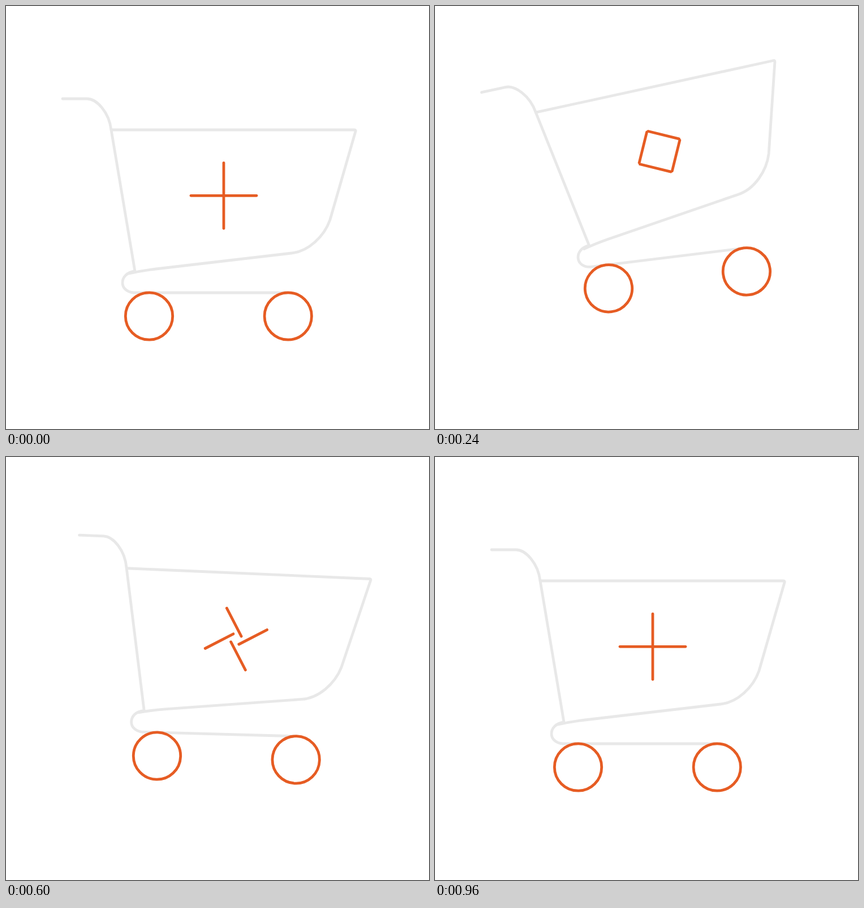
An HTML page that plays this animation: 748x748 px, repeating every 3330 ms.

```html
<!DOCTYPE html>
<html lang="en">
<head>
<meta charset="utf-8">
<title>Add to cart</title>
<style>
  html, body { margin: 0; width: 100%; height: 100%; overflow: hidden; background: #fff; }
  svg { display: block; width: 100vw; height: 100vh; fill: none; stroke-linecap: round; stroke-linejoin: round; }
  .frame { stroke: #e8e8e8; stroke-width: 4.8; }
  .accent { stroke: #e65c23; stroke-width: 4.8; }
</style>
</head>
<body>
<svg viewBox="0 0 748 748">
  <g id="chassis">
    <path class="frame" d="M499 507H226C213 506 206 498 206 489.5C206 480 213 471 228 469"/>
    <g id="basket">
      <path class="frame" d="M100 164H143C160 164 182 187 186 219L228 469"/>
      <path class="frame" d="M186 219H616Q619 219 618 222L573 378C563 407 535 434 505 437L265 465Q240 468 218 473"/>
      <g id="plus" class="accent">
        <path d="M-28 0H28"/><path d="M-28 0H28"/><path d="M-28 0H28"/><path d="M-28 0H28"/>
      </g>
    </g>
    <g class="accent">
      <circle cx="253" cy="548.5" r="41.7"/>
      <circle cx="498.8" cy="548.5" r="41.7"/>
    </g>
  </g>
</svg>
<script>
  const LOOP = 3330, STEP = 30;

  // Key poses of the hop: shift from rest, chassis angle, basket angle
  const poses = [
    { t: 0, x: 0, y: 0, tilt: 0, lean: 0 },
    { t: 90, x: 0, y: 0, tilt: 0, lean: 6.2 },
    { t: 240, x: 54, y: -49.2, tilt: -7, lean: -12.3 },
    { t: 370, x: 48, y: -25, tilt: -1, lean: 1 },
    { t: 480, x: 21, y: -16, tilt: 1.4, lean: 2.8 },
    { t: 600, x: 14, y: -20, tilt: 1.6, lean: 2.5 },
    { t: 720, x: 5, y: -9, tilt: 0.3, lean: -2.2 },
    { t: 780, x: 2.5, y: -5, tilt: 0, lean: -1.3 },
    { t: 960, x: 0, y: 0, tilt: 0, lean: 0 }
  ];

  // Smooth curve through the poses that never overshoots them
  function pose(t, key) {
    const last = poses.length - 1;
    if (t >= poses[last].t) return poses[last][key];
    const i = poses.findIndex(p => p.t > t) - 1;
    const slope = j => (poses[j + 1][key] - poses[j][key]) / (poses[j + 1].t - poses[j].t);
    const tangent = j => {
      if (j === 0 || j === last) return 0;
      const a = slope(j - 1), b = slope(j);
      return a * b <= 0 ? 0 : 2 * a * b / (a + b);
    };
    const span = poses[i + 1].t - poses[i].t;
    const u = (t - poses[i].t) / span, v = 1 - u;
    return poses[i][key] * v * v * (1 + 2 * u) + poses[i + 1][key] * u * u * (3 - 2 * u)
      + span * u * v * (tangent(i) * v - tangent(i + 1) * u);
  }

  // cubic-bezier(.34, 0, .23, 1) from 0 to 1 between two times
  function ease(t, from, to) {
    const x = Math.min(1, Math.max(0, (t - from) / (to - from)));
    let lo = 0, hi = 1;
    for (let n = 0; n < 24; n++) {
      const s = (lo + hi) / 2;
      const at = 1.02 * s * (1 - s) ** 2 + 0.69 * s * s * (1 - s) + s ** 3;
      if (at < x) lo = s; else hi = s;
    }
    return hi * hi * (3 - 2 * hi);
  }

  const [chassis, basket, plus] = ['chassis', 'basket', 'plus'].map(id => document.getElementById(id));
  const place = (el, value) => el.setAttribute('transform', value);

  function draw(t) {
    const [x, y, tilt, lean] = ['x', 'y', 'tilt', 'lean'].map(key => pose(t, key));
    place(chassis, `translate(${x} ${y}) rotate(${tilt} 253 548.5)`);
    place(basket, `rotate(${lean - tilt} 228 469)`);

    // The plus makes a quarter turn while its bars flip into a square and back
    const turn = 90 * ease(t, 0, 950);
    const flip = 90 * (ease(t, 0, 245) + ease(t, 375, 825));
    place(plus, `translate(385 ${335.3 + 0.17 * lean}) rotate(${turn})`);
    [...plus.children].forEach((bar, i) => place(bar, `rotate(${90 * i}) translate(30) rotate(${flip})`));
  }

  const start = performance.now();
  function tick() {
    const t = (performance.now() - start) % LOOP;
    draw(Math.floor(t / STEP) * STEP);
    requestAnimationFrame(tick);
  }
  tick();
</script>
</body>
</html>
```
